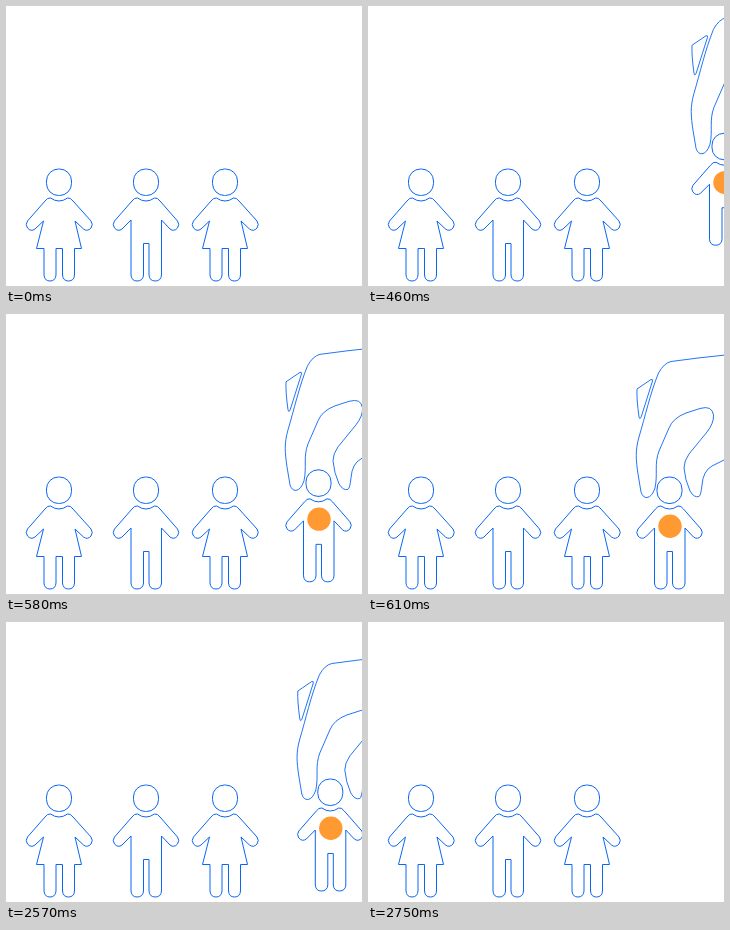
Recreate the animation shown at these times as an HTML page. Size 356 by 280 pixels, loop 3.08 s.

```html
<!DOCTYPE html>
<html lang="en">
<head>
<meta charset="utf-8">
<title>Picking a person</title>
<style>
  html, body { margin: 0; width: 100%; height: 100%; overflow: hidden; background: #fff; }
  svg { display: block; width: 356px; height: 280px; }
  .line { fill: #fff; stroke: #0a66f5; stroke-width: 1; stroke-linejoin: round; }
  .hand { stroke-width: .9; }
</style>
</head>
<body>
<svg viewBox="0 0 356 280">
  <defs>
    <g id="top">
      <rect x="-12.5" y="163" width="25" height="26.5" rx="12"/>
    </g>
    <g id="boy">
      <use href="#top"/>
      <path d="M-8.5 192Q0 198 8.5 192Q11.5 191.500 14 195L31.500 215Q34 218.500 31.500 222Q28 226 24 223L15.500 214V269Q15 275 9.200 275Q3.500 275 3 269V237.500H-2.500V269Q-3 275 -9 275Q-14.500 275 -15 269V214L-24 223Q-28 226 -31.500 222Q-34 218.500 -31.500 215L-14 195Q-11.500 191.500 -8.500 192Z"/>
    </g>
    <g id="girl">
      <use href="#top"/>
      <path d="M-8.500 192Q0 198 8.500 192Q11.500 191.500 14 195L32 215Q34.500 218.500 32 222Q28.500 226 24.500 223L16 215L22.500 242.500H15.500V269Q15 275 9.500 275Q4 275 3.500 269V242.500H-3V269Q-3.500 275 -9 275Q-14.500 275 -15 269V242.500H-22.500L-15.500 215L-24 223Q-28 226 -31.500 222Q-34 218.500 -31.500 215L-14 195Q-11.500 191.500 -8.500 192Z"/>
    </g>
  </defs>
  <g class="line">
    <use href="#girl" x="53"/>
    <use href="#boy" x="140"/>
    <use href="#girl" x="219"/>
    <g id="pick">
      <g class="hand">
        <path d="M269 75L283 65.500Q285 65 284.500 67L273 103.500Q271.500 106 271 103Q268.500 85 269 75Z"/>
        <path d="M362 40.500L330 44L303 47.500Q296 49 290.500 59C282 80 277 103 271 123C267 137 268 146 270 160L273 178Q275 184 279 183.500Q284 183 287 174C290 160 286 150 291 137L301 114Q305 104 318 99L332 94.500Q344 91 345.500 101Q346 109 339 118L321 140Q316 147 316 154Q317 166 322 177Q326 184 331 182.500Q333 181 334 171Q335 157 344 152L362 143"/>
      </g>
      <use href="#boy" x="301.5"/>
      <circle cx="302" cy="212.300" r="11.700" fill="#ff9a33" stroke="none"/>
    </g>
  </g>
</svg>
<script>
  const LOOP = 3080, STEP = 30, COUNT = 8;
  const ENTER = 400, LEAVE = 2540;
  const pick = document.getElementById('pick');

  // Steps completed since a start time, from 0 to COUNT.
  const steps = (t, start) =>
    Math.max(0, Math.min(COUNT, Math.floor((t - start) / STEP + 1.001)));

  function draw() {
    const t = performance.now() % LOOP;
    const away = COUNT - steps(t, ENTER);
    const out = steps(t, LEAVE);
    const x = away * 11 + out * 11.4;
    const y = away * -7.15 - out * 3;
    pick.setAttribute('transform', `translate(${x} ${y})`);
    pick.style.visibility = away === COUNT || out === COUNT ? 'hidden' : 'visible';
    requestAnimationFrame(draw);
  }
  draw();
</script>
</body>
</html>
```
